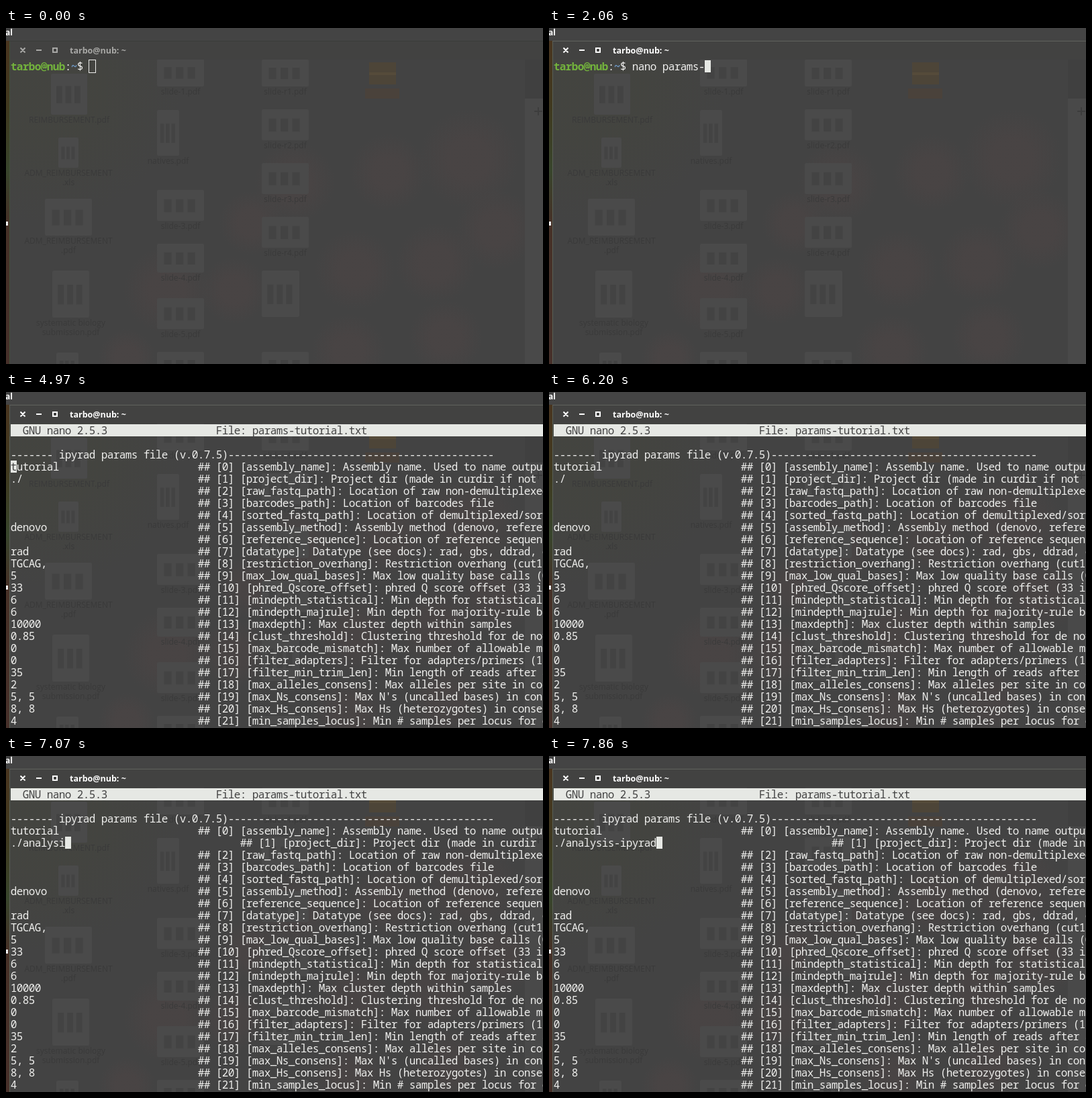
These frames come from a looping animation (800 px wide and 500 px high, 8000 ms). An HTML page with a canvas:

```html
<!DOCTYPE html>
<html lang="en">
<head>
<meta charset="utf-8">
<title>Terminal session</title>
<style>
  html, body { margin: 0; width: 100%; height: 100%; overflow: hidden; background: #434343; }
  canvas { display: block; }
</style>
</head>
<body>
<canvas id="stage" width="800" height="500"></canvas>
<script>
const LOOP = 8000, W = 800, H = 500;
const LEFT = 7, TOP = 48, CELL_W = 9, CELL_H = 18;
const INK = '#eeeeec', PAPER = '#434343', LIGHT = '#e6e8e4';
const MONO = '16px "Noto Sans Mono", monospace';
const USER = 'tarbo@nub', FILE = 'params-tutorial.txt';
const PROMPT_LENGTH = USER.length + 4;

const FOCUS = 850, ENTER = 3920, EDITOR = 3970;
const POINTER = [530, 1210];

// Command line contents over time; the last part is a tab completion.
const COMMAND = [
  [0, ''], [1250, 'n'], [1390, 'na'], [1490, 'nano'], [1580, 'nano '],
  [1850, 'nano pa'], [1920, 'nano para'], [1990, 'nano params'], [2060, 'nano params-'],
  [2460, 'nano params-t'], [2570, 'nano params-tu'], [2680, `nano ${FILE} `]
];

// Editor cursor: time, row, column; no row while blinked off.
const EDITOR_CURSOR = [
  [EDITOR, 2, 0], [4490], [4540, 2, 0], [4970, 3, 0], [5120, 4, 0],
  [5450, 4, 1], [5630, 4, 2], [6200], [6490, 4, 2]
];
const INSERTED = 'analysis-ipyrad';
const KEY_TIMES = [6550, 6640, 6720, 6800, 6890, 6980, 7070, 7170, 7370,
                   7540, 7600, 7670, 7730, 7800, 7860];

const PARAMS = [
  ['tutorial', 'assembly_name', 'Assembly name. Used to name output directories'],
  ['./', 'project_dir', 'Project dir (made in curdir if not present)'],
  ['', 'raw_fastq_path', 'Location of raw non-demultiplexed fastq files'],
  ['', 'barcodes_path', 'Location of barcodes file'],
  ['', 'sorted_fastq_path', 'Location of demultiplexed/sorted fastq files'],
  ['denovo', 'assembly_method', 'Assembly method (denovo, reference)'],
  ['', 'reference_sequence', 'Location of reference sequence file'],
  ['rad', 'datatype', 'Datatype (see docs): rad, gbs, ddrad, etc.'],
  ['TGCAG,', 'restriction_overhang', 'Restriction overhang (cut1,) or (cut1, cut2)'],
  ['5', 'max_low_qual_bases', 'Max low quality base calls (Q<20) in a read'],
  ['33', 'phred_Qscore_offset', 'phred Q score offset (33 is default)'],
  ['6', 'mindepth_statistical', 'Min depth for statistical base calling'],
  ['6', 'mindepth_majrule', 'Min depth for majority-rule base calling'],
  ['10000', 'maxdepth', 'Max cluster depth within samples'],
  ['0.85', 'clust_threshold', 'Clustering threshold for de novo assembly'],
  ['0', 'max_barcode_mismatch', 'Max number of allowable mismatches'],
  ['0', 'filter_adapters', 'Filter for adapters/primers (1 or 2=stricter)'],
  ['35', 'filter_min_trim_len', 'Min length of reads after adapter trim'],
  ['2', 'max_alleles_consens', 'Max alleles per site in consensus'],
  ["5, 5", 'max_Ns_consens', "Max N's (uncalled bases) in consensus"],
  ['8, 8', 'max_Hs_consens', 'Max Hs (heterozygotes) in consensus'],
  ['4', 'min_samples_locus', 'Min # samples per locus for output']
];

const ctx = document.getElementById('stage').getContext('2d');
const backdrop = makeBackdrop();

function latest(list, time) {
  return list.filter(entry => entry[0] <= time).pop();
}

function fill(c, color, x, y, w, h) {
  c.fillStyle = color;
  c.fillRect(x, y, w, h);
}

// The desktop showing faintly through the translucent window.
function makeBackdrop() {
  const canvas = document.createElement('canvas');
  canvas.width = W;
  canvas.height = H;
  const c = canvas.getContext('2d');
  fill(c, PAPER, 0, 0, W, H);

  const glow = (x, y, r, rgb, alpha) => {
    const g = c.createRadialGradient(x, y, r * 0.4, x, y, r);
    g.addColorStop(0, `rgba(${rgb},${alpha})`);
    g.addColorStop(1, `rgba(${rgb},0)`);
    fill(c, g, x - r, y - r, 2 * r, 2 * r);
  };
  glow(60, 90, 200, '68,70,58', 0.35);
  for (const [x, y, r] of [[430, 230, 60], [365, 290, 48], [570, 215, 58], [690, 195, 75],
    [520, 360, 60], [240, 390, 65], [340, 390, 50], [640, 350, 60], [655, 460, 55],
    [180, 490, 42], [510, 480, 55], [730, 300, 60]]) {
    glow(x, y, r, '84,70,70', 0.32);
  }

  c.textAlign = 'center';
  const icon = (x, y, w, h, ...labels) => {
    c.fillStyle = '#4a4a4a';
    c.beginPath();
    c.roundRect(x, y, w, h, 2);
    c.fill();
    for (let i = 0; i < 3; i++) fill(c, '#434343', x + w * (0.15 + i * 0.25), y + h * 0.3, w * 0.16, h * 0.42);
    c.fillStyle = '#3a3a3a';
    c.font = '12px "Open Sans", sans-serif';
    labels.forEach((label, i) => c.fillText(label, x + w / 2, y + h + 12 + i * 14));
  };
  icon(67, 68, 54, 61, 'REIMBURSEMENT.pdf');
  icon(78, 163, 30, 45, 'ADM_REIMBURSEMENT', '.xls');
  icon(58, 254, 70, 55, 'ADM_REIMBURSEMENT', '.pdf');
  icon(69, 361, 55, 70, 'systematic biology', 'submission.pdf');
  icon(75, 483, 33, 40);
  icon(225, 46, 70, 41, 'slide-1.pdf');
  icon(225, 122, 33, 68, 'natives.pdf');
  icon(225, 241, 70, 46, 'slide-3.pdf');
  icon(225, 321, 70, 43, 'slide-4.pdf');
  icon(225, 402, 70, 46, 'slide-5.pdf');
  icon(225, 482, 70, 40);
  [47, 121, 201, 281].forEach((y, i) => icon(381, y, 70, i ? 46 : 40, `slide-r${i + 1}.pdf`));
  icon(381, 361, 56, 69);
  icon(381, 482, 70, 40);

  fill(c, '#4d4538', 541, 51, 40, 33);
  fill(c, '#554b3a', 541, 66, 40, 4);
  fill(c, '#4a423b', 535, 90, 51, 15);
  fill(c, '#404040', 773, 47, 27, 58);
  fill(c, '#494949', 773, 105, 27, 395);
  fill(c, '#3d3d3d', 787, 123, 12, 2);
  fill(c, '#3d3d3d', 792, 118, 2, 12);

  // Top panel and title bar
  fill(c, '#444444', 0, 0, W, 19);
  fill(c, '#424241', 5, 20, W, 27);
  c.textAlign = 'left';
  c.fillStyle = '#ffffff';
  c.font = 'bold 12px "Open Sans", sans-serif';
  c.fillText('al', -1, 11);

  // Strip of wallpaper left of the window
  const strip = c.createLinearGradient(0, 20, 0, H);
  [[0, '#49351f'], [0.2, '#40391f'], [0.4, '#38452c'], [0.56, '#463127'], [1, '#46302a']]
    .forEach(([stop, color]) => strip.addColorStop(stop, color));
  fill(c, strip, 0, 19, 5, H);
  fill(c, '#eeeeee', 0, 288, 3, 6);
  return canvas;
}

function write(text, row, col, color = INK, bold = false) {
  ctx.font = (bold ? 'bold ' : '') + MONO;
  ctx.textAlign = 'center';
  ctx.fillStyle = color;
  const y = TOP + row * CELL_H + 15;
  [...text].forEach((char, i) => {
    const x = LEFT + (col + i + 0.5) * CELL_W;
    if (char !== ' ' && x < W + CELL_W) ctx.fillText(char, x, y);
  });
}

function drawCursor(row, col, char = ' ') {
  fill(ctx, LIGHT, LEFT + col * CELL_W, TOP + row * CELL_H, CELL_W, CELL_H);
  write(char, row, col, PAPER);
}

function drawFrame(focused) {
  ctx.drawImage(backdrop, 0, 0);
  const line = focused ? '#60625d' : '#3b3c39';
  fill(ctx, line, 5, 19, W, 1);
  fill(ctx, focused ? '#596055' : '#415039', 5, 20, 1, H);

  const color = focused ? '#ffffff' : '#a8a8a6';
  ctx.strokeStyle = color;
  ctx.lineWidth = 2;
  ctx.stroke(new Path2D('M21.5 29.5l7 7m0-7l-7 7M45 33h8M70 30h6v6h-6z'));
  ctx.fillStyle = color;
  ctx.textAlign = 'left';
  ctx.font = 'bold 12.5px "Open Sans", sans-serif';
  ctx.fillText(`${USER}: ~`, 95, 38);
}

function drawShell(time) {
  const command = latest(COMMAND, time)[1];
  write(USER, 0, 0, '#73b33c', true);
  write(':', 0, USER.length);
  write('~', 0, USER.length + 1, '#729fcf', true);
  write('$ ' + command, 0, USER.length + 2);

  if (time < FOCUS) {
    ctx.strokeStyle = INK;
    ctx.lineWidth = 1;
    ctx.strokeRect(LEFT + PROMPT_LENGTH * CELL_W - 0.5, TOP - 0.5, CELL_W + 1, CELL_H + 1);
  } else if (time >= ENTER) {
    drawCursor(1, 0);
  } else if (time < 3270 || time >= 3870) {
    drawCursor(0, PROMPT_LENGTH + command.length);
  }

  // Text pointer, cut off by the bottom edge
  if (time >= POINTER[0] && time < POINTER[1]) {
    fill(ctx, '#dddddd', 721, 488, 7, 3);
    fill(ctx, '#dddddd', 723, 490, 3, 10);
    fill(ctx, '#222222', 722, 489, 5, 1);
    fill(ctx, '#222222', 724, 490, 1, 10);
  }
}

function drawEditor(time) {
  const typed = INSERTED.slice(0, KEY_TIMES.filter(key => key <= time).length);
  const lines = ['', '', '------- ipyrad params file (v.0.7.5)' + '-'.repeat(44)];
  PARAMS.forEach(([value, name, help], i) => {
    const line = value.padEnd(31) + `## [${i}] [${name}]: ${help}`;
    lines.push(i === 1 ? './' + typed + line.slice(2) : line);
  });

  fill(ctx, LIGHT, LEFT, TOP, W, CELL_H);
  write('GNU nano 2.5.3', 0, 2, PAPER);
  write(`File: ${FILE}`, 0, 34, PAPER);
  lines.forEach((line, row) => write(line, row, 0));

  const [, row, col] = latest(EDITOR_CURSOR, time);
  if (row) drawCursor(row, col + typed.length, lines[row][col + typed.length]);
}

function render(now) {
  const time = now % LOOP;
  drawFrame(time >= FOCUS);
  (time < EDITOR ? drawShell : drawEditor)(time);
  requestAnimationFrame(() => render(performance.now() - start));
}

const start = performance.now();
render(0);
</script>
</body>
</html>
```
